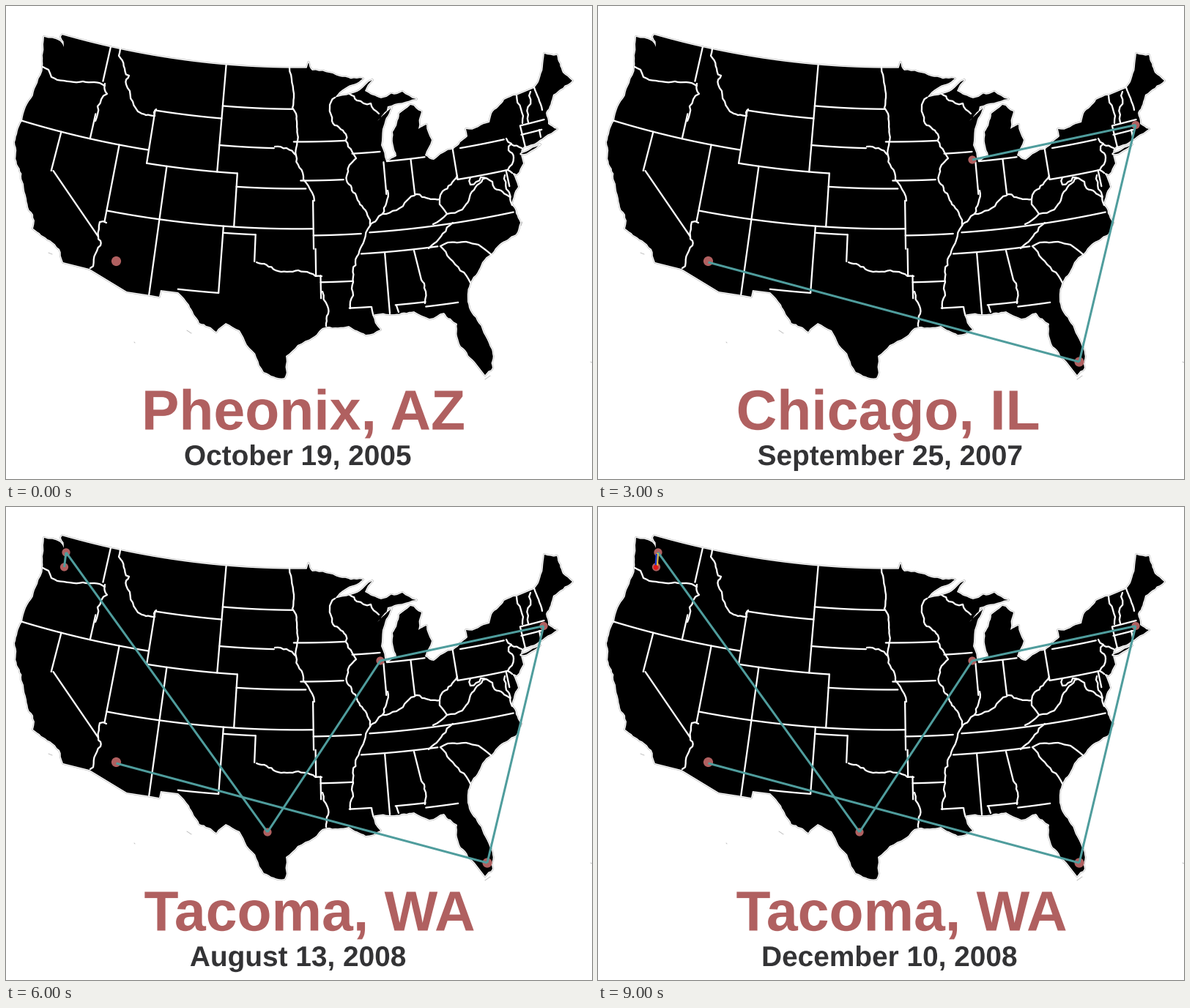
A matplotlib script that plays this animation: 800 by 646 pixels, repeating every 10000 ms.

```python
import numpy as np
import matplotlib.pyplot as plt
from matplotlib.animation import FuncAnimation
from matplotlib.patches import Circle, PathPatch, Polygon
from matplotlib.path import Path
from matplotlib.textpath import TextPath

W, H, DPI = 800, 646, 100
PX = 72 / DPI
RED, TEAL, INK = "#b06060", "#4f9d9d", "#333335"
BOLD = dict(family="Liberation Sans", weight="bold")

fig = plt.figure(figsize=(W / DPI, H / DPI), dpi=DPI, facecolor="white")
ax = fig.add_axes([0, 0, 1, 1])
ax.set_xlim(0, W)
ax.set_ylim(H, 0)
ax.axis("off")
rng = np.random.default_rng(4)


def project(lat, west):
    """Conic projection of latitude and western longitude to stage pixels."""
    r = 1242 + 18.3 * (45 - lat)
    angle = np.radians(0.6029 * (96 - west))
    return np.column_stack([399.5 + r * np.sin(angle), -1084 + r * np.cos(angle)])


def rough(*flat, amount=0.055):
    """Fractal line through key points: bend midpoints until pieces are short."""
    pts = np.array(flat, float).reshape(-1, 2)
    out = [pts[0]]

    def split(a, b):
        d = b - a
        size = np.hypot(*d)
        if size < 6:
            out.append(b)
            return
        bend = np.clip(rng.normal(0, amount), -2 / size, 2 / size)
        mid = (a + b) / 2 + bend * np.array([-d[1], d[0]])
        split(a, mid)
        split(mid, b)

    for a, b in zip(pts[:-1], pts[1:]):
        split(a, b)
    return np.array(out)


def stroke(points, width=2.3):
    ax.plot(points[:, 0], points[:, 1], color="white", lw=width * PX, zorder=3,
            solid_joinstyle="round", solid_capstyle="round")


def parallel(lat, west, east):
    stroke(project(np.full(20, lat), np.linspace(west, east, 20)))


def meridian(west, top, bottom):
    stroke(project(np.array([top, bottom]), np.array([west, west])))


def river(*flat, amount=0.1):
    stroke(rough(*flat, amount=amount))


def land(points):
    """Black area with a white rim and a thin grey edge."""
    for color, lw in (("#a8a8a8", 3.6), ("white", 2.6), ("black", 0)):
        ax.add_patch(Polygon(points, closed=True, fc="white" if lw else "black",
                             ec=color, lw=lw * PX, joinstyle="round", zorder=1))


pacific = rough(78, 350, 73, 332, 60, 320, 37, 304, 39, 293, 28, 263, 24, 243, 15, 216,
                12, 186, 22, 157, 27, 138, 43, 105, 50, 83, 51, 52, 52, 42, 74, 48,
                79, 56, 75, 42)
north = project(np.full(30, 49), np.linspace(122.6, 95.1, 30))
lakes = rough(413, 77, 418, 88, 455, 96, 487, 99, 463, 112, 449, 125, 470, 120, 483, 115,
              500, 101, 490, 116, 512, 126, 541, 117, 560, 127, 521, 137, 507, 157,
              526, 139, 514, 168, 512, 190, 519, 212, 533, 205, 528, 172, 537, 147,
              552, 135, 567, 144, 563, 168, 574, 162, 581, 183, 572, 204, 584, 210,
              611, 195, 630, 178, 628, 168, 660, 159, 663, 147, 680, 128, 697, 122)
atlantic = rough(721, 112, 728, 101, 735, 65, 752, 67, 760, 91, 773, 102, 747, 121,
                 737, 146, 740, 161, 752, 168, 736, 178, 704, 195, 706, 215, 697, 230,
                 691, 228, 699, 247, 690, 270, 702, 296, 696, 312, 674, 325, 650, 350,
                 634, 377, 630, 404, 645, 433, 663, 469, 664, 494, 654, 504)
gulf = rough(640, 486, 619, 461, 616, 434, 598, 419, 578, 427, 557, 417, 530, 421,
             500, 422, 511, 442, 491, 449, 468, 437, 438, 438, 398, 463, 382, 478,
             380, 508, 352, 500, 342, 480, 319, 443, 300, 433, 287, 445, 264, 433,
             250, 408, 235, 391)
desert = rough(211, 388, 209, 397, 198, 395, 165, 390, 114, 359, amount=0)
land(np.vstack([pacific, north, lakes, atlantic, gulf, desert]))
land(rough(703, 202, 729, 189, 703, 202))

# Borders along parallels: latitude, west end, east end
for line in ((42, 124.2, 111.05), (45, 111.05, 104.05), (41, 111.05, 102.05),
             (37, 114.05, 94.62), (45.94, 104.05, 96.6), (43, 104.05, 98.5),
             (40, 102.05, 95.3), (43.5, 96.5, 91.2), (40.6, 95.8, 91.6),
             (36.5, 103.03, 100), (36.5, 94.62, 90.2), (32, 106.6, 103.03),
             (33, 94.04, 91.2), (31, 91.6, 89.73), (35, 90.3, 83.3),
             (36.55, 89.4, 75.9), (31, 87.6, 85), (30.65, 85, 82.2),
             (42.5, 90.6, 87.8), (41.74, 87.2, 83.4), (42, 79.76, 75.3),
             (39.72, 80.52, 75.6), (42.73, 73.3, 70.9), (42.05, 73.5, 71.4)):
    parallel(*line)

# Borders along meridians: longitude, north end, south end
for line in ((117.04, 49, 46.4), (117.04, 43.9, 42), (120, 42, 39), (114.05, 42, 36.2),
             (111.05, 45, 41), (109.05, 41, 31.33), (104.05, 49, 41), (102.05, 41, 37),
             (103.03, 37, 32), (100, 36.5, 34.5), (94.62, 39.1, 35.5),
             (94.45, 35.5, 33.5), (94.04, 33.5, 31.8), (88.15, 35, 30.4),
             (87.53, 41.7, 39.3), (84.81, 41.7, 39.1), (80.52, 42.2, 39.72),
             (73.4, 42.73, 41.1), (75.75, 39.72, 38.5)):
    meridian(*line)
stroke(rough(64.5, 225, 126, 315, amount=0))
stroke(rough(557, 334, 567, 374, amount=0))

# Rivers and ridges
river(50, 83, 58, 87, 62, 97, 70, 101, 105, 103, 135, 109, amount=0.04)
river(135, 106, 138, 120, 125, 137, 122, 157)
river(156, 58, 154, 68, 168, 95, 164, 107, 180, 144, 191, 149, 203, 150, 205, 141)
river(137, 296, 128, 295, 126, 315, 129, 327, 115, 358)
river(387, 84, 393, 125, 391, 139, 396, 147, 396, 204, amount=0.05)
river(367, 192, 383, 194, 396, 204, 406, 237, 418, 255, 421, 266)
river(342, 350, 368, 361, 399, 361, 431, 369)
river(432, 390, 439, 410, 437, 437)
river(449, 125, 442, 139, 445, 157, 464, 175, 467, 192, 478, 208, 469, 217, 466, 241,
      479, 262, 486, 273, 497, 300, 489, 320, 477, 350, 474, 377, 470, 413)
river(469, 120, 479, 129, 498, 133, 509, 147)
river(521, 252, 514, 284)
river(497, 300, 506, 292, 514, 284, 533, 279, 548, 265, 560, 257, 568, 261, 592, 264,
      596, 253, 616, 232)
river(592, 265, 602, 284, 623, 278, 634, 257, 655, 235)
river(634, 234, 634, 244, 648, 234, 664, 240, 667, 249, 688, 261)
river(610, 296, 596, 311, 577, 331)
river(602, 284, 583, 298)
river(593, 328, 603, 323, 628, 322, 645, 326, 663, 340, amount=0.02)
river(593, 328, 606, 345, 634, 378)
river(567, 374, 571, 385, 572, 406)
river(499, 411, 501, 421)
river(533, 409, 536, 418)
river(683, 181, 690, 188, 686, 197, 693, 207, 685, 224, 691, 228)
river(690, 189, 704, 194)
river(681, 231, 683, 250, 691, 272)
river(697, 122, 705, 160)
river(716, 117, 713, 159)
river(721, 111, 732, 142, amount=0.02)
river(728, 169, 730, 179)

# Faint islands
for x, y, dx, dy in ((58, 337, 5, 2), (175, 459, 1, 1), (247, 443, 6, 4),
                     (703, 300, 2, -5), (798, 486, 2, 1), (654, 510, 7, -5)):
    ax.plot([x, x + dx], [y, y + dy], color="#b4b4b4", lw=0.8 * PX, zorder=2)


def label(text, size, cx, base, color):
    """Text with its ink centred on cx."""
    path = TextPath((0, 0), text, size=size, prop=BOLD)
    box = path.get_extents()
    verts = path.vertices * [1, -1] + [cx - (box.x0 + box.x1) / 2, base]
    return ax.add_patch(PathPatch(Path(verts, path.codes), fc=color, lw=0, zorder=8))


def dot(xy, r=5.6, color=RED, z=4):
    return ax.add_patch(Circle(xy, r, fc=color, lw=0, zorder=z))


def route(a, b, color=TEAL, lw=3, z=5):
    return ax.plot([a[0], b[0]], [a[1], b[1]], color=color, lw=lw * PX, zorder=z,
                   solid_capstyle="butt")[0]


phoenix, miami, boston = (150.5, 348.5), (657, 486), (734, 162.5)
chicago, antonio = (511, 210), (357, 444)
seattle, tacoma = (82, 62), (79.5, 82)

# Title, its centre, date
stops = [
    ("Pheonix, AZ", 407.5, "October 19, 2005"),
    ("Miami, FL", 398.5, "September 12, 2006"),
    ("Boston, MA", 400, "June 13, 2007"),
    ("Chicago, IL", 396.5, "September 25, 2007"),
    ("San Antonio, TX", 398.5, "June 11, 2008"),
    ("Seattle, WA", 398.5, "July 17, 2008"),
    ("Tacoma, WA", 414, "August 13, 2008"),
    ("Seattle, WA", 398.5, "October 15, 2008"),
    ("Tacoma, WA", 414, "November 12, 2008"),
    ("Tacoma, WA", 414, "December 10, 2008"),
]
captions = [(label(city, 77, cx, 578.5, RED), label(date, 38.8, 398.5, 627, INK))
            for city, cx, date in stops]

# Marks that appear at each stop and then stay
marks = [
    [dot(phoenix, 6.6)],
    [dot(miami, 6.6), route((150.5, 350), miami)],
    [dot(boston), route(miami, boston)],
    [dot(chicago), route(boston, chicago)],
    [dot(antonio), route(chicago, antonio)],
    [dot(seattle), route(antonio, seattle)],
    [dot(tacoma), route(seattle, tacoma)],
    [route((81.3, 63), (80.5, 83), "#e9b93c", 3, 6)],
    [route((79.8, 64), (78.6, 81), "#1638c8", 2.4, 7)],
    [dot((79, 82.5), 3.4, "#e01818", 7.5)],
]


def draw(i):
    for k, (caption, group) in enumerate(zip(captions, marks)):
        for art in caption:
            art.set_visible(k == i)
        for art in group:
            art.set_visible(k <= i)
    return []


anim = FuncAnimation(fig, draw, frames=len(stops), interval=1000, repeat=True,
                     repeat_delay=0, blit=False)
plt.show()
```
